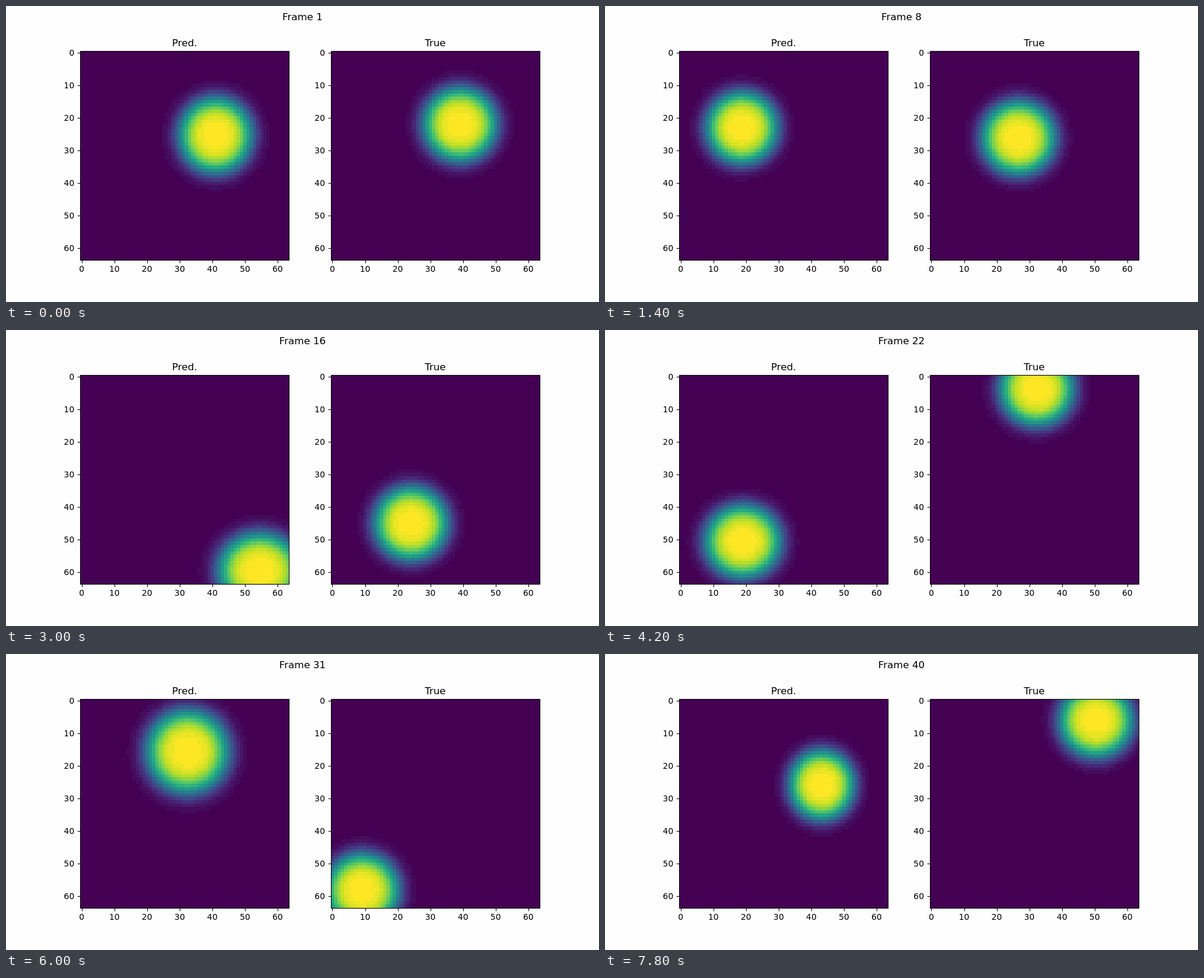
Recreate the animation shown at these times as an HTML page with a canvas. Size 1000 px wide and 500 px high, loop 8 s.

```html
<!DOCTYPE html>
<html lang="en">
<head>
<meta charset="utf-8">
<title>Bouncing ball prediction</title>
<style>
  html, body { margin: 0; width: 100%; height: 100%; overflow: hidden; background: #fefefe; }
  canvas { display: block; }
</style>
</head>
<body>
<canvas id="stage" width="1000" height="500"></canvas>
<script>
const ctx = document.getElementById('stage').getContext('2d');
const STEP = 200, STEPS = 40;
const GRID = 64, WALL = 63;
const SIZE = 775 / 2.2, CELL = SIZE / GRID, TOP = 252.5 - SIZE / 2;
const PANELS = [
  { title: 'Pred.', left: 125, ball: predictedBall },
  { title: 'True', left: 900 - SIZE, ball: trueBall }
];

const VIRIDIS = ['440154', '482475', '414487', '355f8d', '2a788e', '21918c',
  '22a884', '44bf70', '7ad151', 'bddf26', 'fde725']
  .map(hex => [0, 2, 4].map(i => parseInt(hex.slice(i, i + 2), 16)));
const LEVELS = 36;
const PALETTE = Array.from({ length: LEVELS + 1 }, (_, level) => {
  const pos = level / LEVELS * 10, i = Math.min(9, Math.floor(pos));
  const rgb = VIRIDIS[i].map((c, j) => Math.round(c + (VIRIDIS[i + 1][j] - c) * (pos - i)));
  return `rgb(${rgb})`;
});

// Predicted path: step, unfolded x and y, horizontal and vertical reach
const PATH = [
  [0, -41, -25.3, 16.4, 16.9],
  [7, 18.7, 23, 16, 16.1],
  [15, 71.5, 59.5, 18.5, 17],
  [21, 107, 75.5, 17, 16.4],
  [25, 132, 89.4, 18.6, 19],
  [30, 158.4, 110.4, 18.4, 18.6],
  [39, 208.8, 151.8, 14.6, 15.6]
];

// Reflects an unbounded coordinate between the walls
function bounce(u) {
  const period = 2 * WALL, m = ((u % period) + period) % period;
  return m > WALL ? period - m : m;
}

function slope(i, col) {
  const a = PATH[Math.max(0, i - 1)], b = PATH[Math.min(PATH.length - 1, i + 1)];
  return (b[col] - a[col]) / (b[0] - a[0]);
}

function along(step, col) {
  let i = 0;
  while (i < PATH.length - 2 && step >= PATH[i + 1][0]) i++;
  const a = PATH[i], b = PATH[i + 1], h = b[0] - a[0], s = (step - a[0]) / h;
  const s2 = s * s, s3 = s2 * s;
  return a[col] * (2 * s3 - 3 * s2 + 1) + b[col] * (3 * s2 - 2 * s3)
    + h * (slope(i, col) * (s3 - 2 * s2 + s) + slope(i + 1, col) * (s3 - s2));
}

function predictedBall(step) {
  return {
    x: bounce(along(step, 1)), y: bounce(along(step, 2)),
    rx: along(step, 3), ry: along(step, 4)
  };
}

function trueBall(step) {
  return { x: bounce(9.4 * step - 39.1), y: bounce(6.87 * step - 22), rx: 16.5, ry: 16.5 };
}

const snap = v => Math.floor(v + 0.5) + 0.5;

function text(str, x, y, size, align = 'center') {
  ctx.font = `${size}px "DejaVu Sans", sans-serif`;
  ctx.textAlign = align;
  ctx.fillText(str, x, y);
}

function line(x1, y1, x2, y2) {
  ctx.beginPath();
  ctx.moveTo(x1, y1);
  ctx.lineTo(x2, y2);
  ctx.stroke();
}

function drawField(left, ball) {
  const edge = (start, i) => Math.round(start + i * CELL);
  ctx.fillStyle = PALETTE[0];
  ctx.fillRect(edge(left, 0), edge(TOP, 0), Math.ceil(SIZE), Math.ceil(SIZE));
  for (let row = 0; row < GRID; row++) {
    for (let col = 0; col < GRID; col++) {
      const dx = (col - ball.x) / ball.rx, dy = (row - ball.y) / ball.ry;
      const value = Math.exp(-4.24 * (dx * dx + dy * dy) ** 2);
      const level = Math.round(value * LEVELS);
      if (!level) continue;
      const x = edge(left, col), y = edge(TOP, row);
      ctx.fillStyle = PALETTE[level];
      ctx.fillRect(x, y, edge(left, col + 1) - x, edge(TOP, row + 1) - y);
    }
  }
}

function drawAxes(left, title) {
  const x0 = snap(left), y0 = snap(TOP), x1 = snap(left + SIZE), y1 = snap(TOP + SIZE);
  ctx.strokeStyle = ctx.fillStyle = '#000';
  ctx.lineWidth = 1.11;
  ctx.strokeRect(x0, y0, x1 - x0, y1 - y0);
  for (let n = 0; n <= 60; n += 10) {
    const offset = (n + 0.5) * CELL, x = left + offset, y = TOP + offset;
    line(snap(x), y1, snap(x), y1 + 4.86);
    line(x0, snap(y), x0 - 4.86, snap(y));
    text(n, x, 449, 13.89);
    text(n, left - 9.72, Math.round(y + 5), 13.89, 'right');
  }
  text(title, left + SIZE / 2, 68, 16.67);
}

function draw(step) {
  ctx.fillStyle = '#fefefe';
  ctx.fillRect(0, 0, 1000, 500);
  for (const { title, left, ball } of PANELS) {
    drawField(left, ball(step));
    drawAxes(left, title);
  }
  text(`Frame ${step + 1}`, 500, 24, 16.67);
}

const start = performance.now();
let shown = -1;
function tick() {
  const step = Math.floor((performance.now() - start) / STEP) % STEPS;
  if (step !== shown) draw(shown = step);
  requestAnimationFrame(tick);
}
tick();
</script>
</body>
</html>
```
